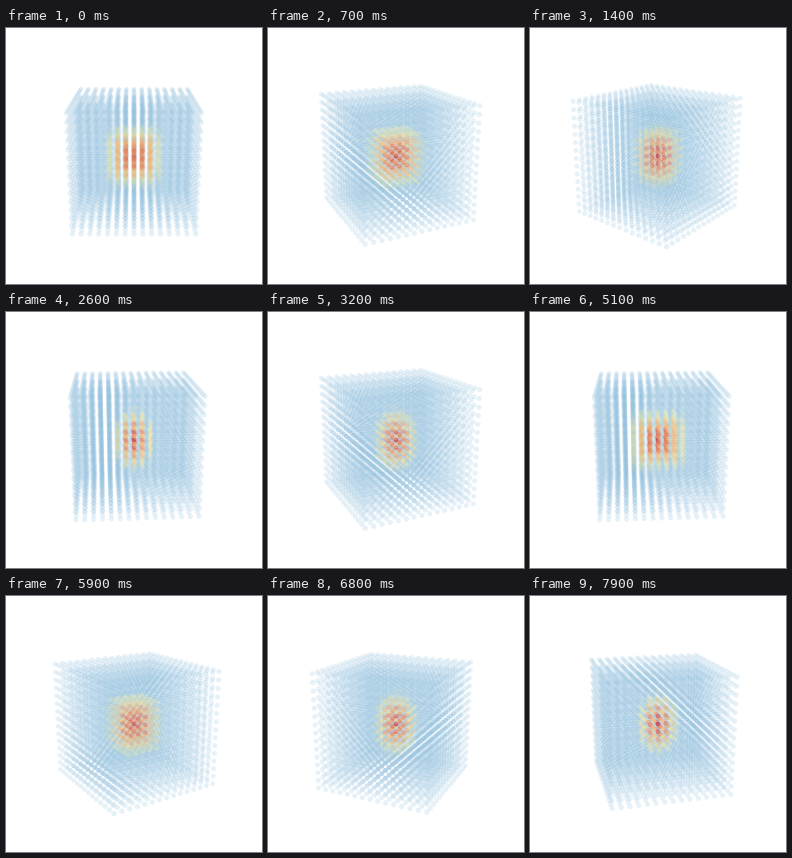
These frames come from a looping animation (256x256 px, 8 s). A matplotlib script:

```python
import numpy as np
import matplotlib.pyplot as plt
from matplotlib.animation import FuncAnimation
from matplotlib.colors import LinearSegmentedColormap

SIZE, DPI = 256, 100
FRAMES, INTERVAL = 80, 100
TURN = np.radians(3.6)          # rotation per frame
PULSE = 50                      # frames per cube -> ellipsoid -> cube cycle
N = 15
ELEV = np.radians(18.3)
DIST = 8.36                     # camera distance in half cube sides
FOCAL = SIZE / 2 / np.tan(np.radians(15))
DOT = 4.8                       # dot diameter at the cube centre, px

HEAT = LinearSegmentedColormap.from_list(
    "heat", ["#c3213f", "#d63a3c", "#ee6f4b", "#f7b468", "#eee88e", "#8abcdc"])

cells = np.arange(N) - (N - 1) / 2
X, Y, Z = (g.ravel() for g in np.meshgrid(cells, cells, cells, indexing="ij"))


def mix(a, b, t):
    return a + (b - a) * t


def project(angle):
    """Screen position and depth of every grid point."""
    c, s = np.cos(angle), np.sin(angle)
    half = cells[-1]
    side, near, z = (X * c + Y * s) / half, (Y * c - X * s) / half, Z / half
    depth = DIST - near * np.cos(ELEV) - z * np.sin(ELEV)
    up = z * np.cos(ELEV) - near * np.sin(ELEV)
    xy = SIZE / 2 + FOCAL * np.column_stack([side, up]) / depth[:, None]
    return xy, depth


def field(i):
    """0 at the centre, 1 on the surface of the hot core and beyond."""
    box = (0.5 + 0.5 * np.cos(2 * np.pi * i / PULSE)) ** 1.5
    power = mix(2, 6, box)
    width, height = mix(2.9, 3.6, box), mix(4.5, 3.6, box)
    total = (abs(X / width) ** power + abs(Y / width) ** power
             + abs(Z / height) ** power)
    return np.minimum(total ** (1 / power), 1)


fig = plt.figure(figsize=(SIZE / DPI, SIZE / DPI), dpi=DPI, facecolor="white")
ax = fig.add_axes([0, 0, 1, 1])
ax.set(xlim=(0, SIZE), ylim=(0, SIZE))
ax.axis("off")
dots = ax.scatter(X, Y, s=1, linewidths=0)


def draw(i):
    xy, depth = project(i * TURN)
    v = field(i)
    rgba = HEAT(v)
    rgba[:, 3] = mix(0.7, 0.2, v)
    order = np.lexsort((-depth, v < 0.95))   # far to near, core on top
    dots.set_offsets(xy[order])
    dots.set_facecolors(rgba[order])
    dots.set_sizes((DOT * 72 / DPI * DIST / depth[order]) ** 2)
    return (dots,)


anim = FuncAnimation(fig, draw, frames=FRAMES, interval=INTERVAL,
                     repeat=True, repeat_delay=0, blit=False)
plt.show()
```
